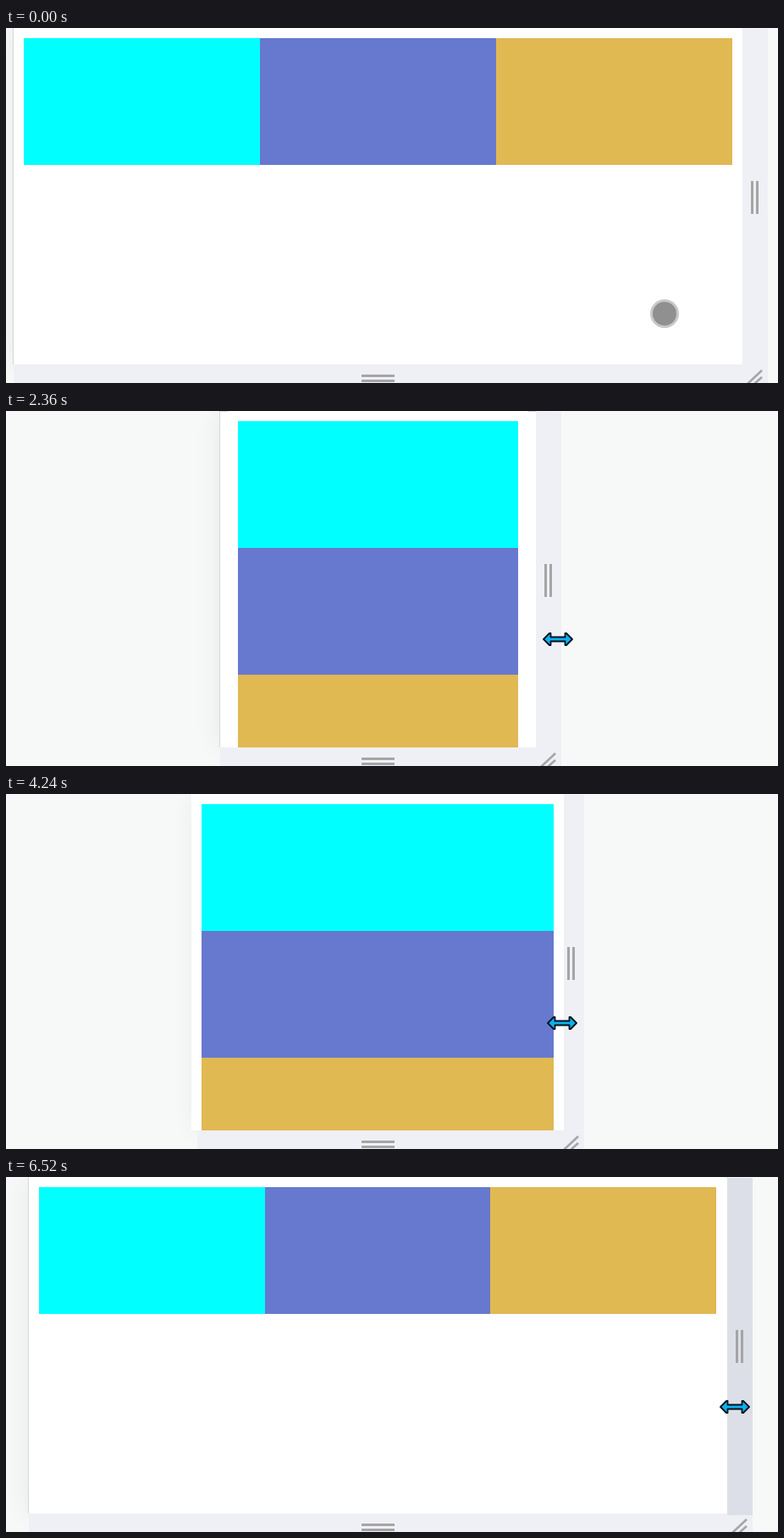
Write an HTML page with a canvas that moves like this. It is 912 px wide and 420 px high and loops after 6.56 s.

```html
<!DOCTYPE html>
<html lang="en">
<head>
<meta charset="utf-8">
<title>Responsive grid resize</title>
<style>
  html, body { margin: 0; width: 100%; height: 100%; overflow: hidden; background: #f7f9f8; }
  canvas { display: block; }
</style>
</head>
<body>
<canvas id="stage" width="912" height="420"></canvas>
<script>
const ctx = document.getElementById('stage').getContext('2d');
const LOOP = 6560, STEP = 40, CENTER = 439.5, BOTTOM = 398;
const GRAB = 11, DRAG_START = 520, DRAG_END = 6100, HOVER_START = 6200;
const GRIP = '#a5a5a5', STRIP = '#eff0f5', STRIP_HOVER = '#dddfe8';
const CELLS = ['#00ffff', '#6779cf', '#e0b953'];

// Pointer moves, each added to the ones before and easing out
const START = { x: 778, y: 338 };
const moves = [
  { from: 0, to: 480, x: 103, y: -68 },      // reach the handle
  { from: 720, to: 1460, x: -258, y: 0 },    // narrow to one column
  { from: 1640, to: 2100, x: 5, y: 0 },
  { from: 2300, to: 3100, x: 168, y: 2 },    // widen to two columns
  { from: 3000, to: 3400, x: 83, y: 4 },     // and to three
  { from: 3600, to: 4480, x: -240, y: -5 },  // narrow again
  { from: 4720, to: 5640, x: 216, y: 1 },    // widen again
  { from: 5840, to: 5960, x: 7.5, y: 0 },
  { from: 6120, to: 6480, x: -1.5, y: 0 }
];

const clamp = (v, lo, hi) => Math.min(hi, Math.max(lo, v));
const easeOut = u => u * (2 - u);

function pointer(t, axis) {
  return moves.reduce((sum, m) =>
    sum + m[axis] * easeOut(clamp((t - m.from) / (m.to - m.from), 0, 1)), START[axis]);
}

// Half the width the drag gives, in half pixels
function halfWidth(t) {
  const x = pointer(clamp(t, DRAG_START, DRAG_END), 'x');
  return Math.round(2 * (x - GRAB - CENTER)) / 2;
}

function rect(color, left, top, right, bottom) {
  ctx.fillStyle = color;
  ctx.fillRect(left, top, right - left, bottom - top);
}

function line(x1, y1, x2, y2) {
  ctx.beginPath();
  ctx.moveTo(x1, y1);
  ctx.lineTo(x2, y2);
  ctx.stroke();
}

function drawFrame(half, hovered) {
  const left = Math.floor(CENTER - half), right = Math.ceil(CENTER + half);
  ctx.shadowColor = 'rgba(0,0,0,.07)';
  ctx.shadowBlur = 30;
  rect('#d6d7d8', left - 1, 0, right, BOTTOM);
  ctx.shadowColor = 'transparent';
  rect('#fff', left, 1, right, BOTTOM);

  rect(STRIP, left, BOTTOM, right + 30, 420);
  rect(hovered ? STRIP_HOVER : STRIP, right, 1, right + 30, 400);
  for (const offset of [0, 6]) {
    rect(GRIP, right + 10 + offset, 181, right + 13 + offset, 220);
    rect(GRIP, 420, 410 + offset, 459, 413 + offset);
  }
  ctx.strokeStyle = GRIP;
  ctx.lineWidth = 2.6;
  line(right + 6, 421, right + 23, 405);
  line(right + 14, 421, right + 23, 413);
}

function drawPage(half) {
  const left = Math.floor(CENTER - half), right = Math.floor(CENTER + half);
  rect('#fff', left, 0, right, BOTTOM);
  const x = left + 12, width = right - left - 24;
  const columns = clamp(Math.floor(width / 225), 1, 3);
  const edge = c => Math.round(x + c * width / columns);
  CELLS.forEach((color, i) => {
    const c = i % columns, top = 12 + 150 * Math.floor(i / columns);
    rect(color, edge(c), top, edge(c + 1), Math.min(top + 150, BOTTOM));
  });
}

function disc(x, y, r, color) {
  ctx.fillStyle = color;
  ctx.beginPath();
  ctx.arc(x, y, r, 0, 7);
  ctx.fill();
}

function drawPointer(x, y, resizing) {
  if (!resizing) {
    disc(x, y, 17, '#c8c8c8');
    disc(x, y, 14, '#909090');
    return;
  }
  const side = [[-17, 0], [-10, -7], [-8.5, -7], [-8.5, -2.5], [8.5, -2.5], [8.5, -7], [10, -7]];
  ctx.beginPath();
  for (const sign of [1, -1]) {
    for (const [dx, dy] of side) ctx.lineTo(x + sign * dx, y + sign * dy);
  }
  ctx.closePath();
  ctx.fillStyle = '#0cb0f0';
  ctx.fill();
  ctx.strokeStyle = '#061018';
  ctx.lineWidth = 1.8;
  ctx.lineJoin = 'round';
  ctx.stroke();
}

// The frame trails the pointer by one step, the page by two
function draw(now) {
  const t = Math.floor(now % LOOP / STEP) * STEP;
  const x = Math.round(pointer(t, 'x')), y = Math.round(pointer(t, 'y'));
  rect('#f7f9f8', 0, 0, 912, 420);
  drawFrame(halfWidth(t - STEP), t >= HOVER_START);
  drawPage(halfWidth(t - 2 * STEP));
  drawPointer(x, y, t > DRAG_START || x >= 870);
  requestAnimationFrame(draw);
}
requestAnimationFrame(draw);
</script>
</body>
</html>
```
